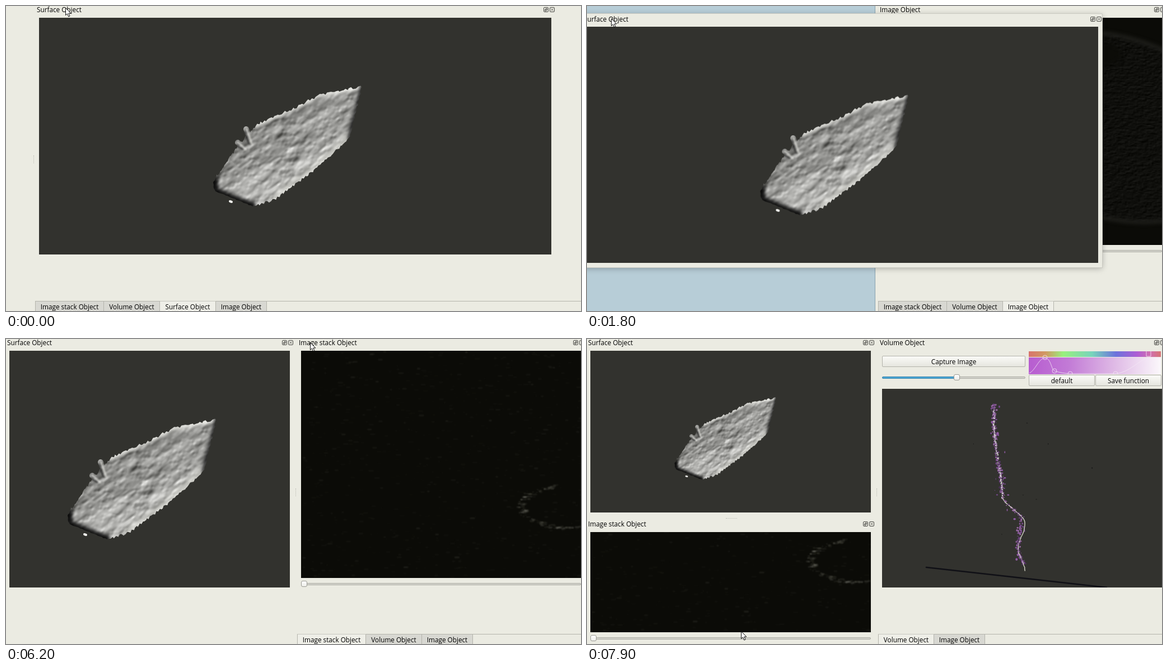
These frames come from a looping animation (1027 by 545 pixels, 8 s). An HTML page with a canvas:

```html
<!DOCTYPE html>
<html lang="en">
<head>
<meta charset="utf-8">
<title>Dock panels</title>
<style>
html, body { margin: 0; width: 100%; height: 100%; overflow: hidden; background: #ebebe2; }
body { position: relative; font: 11.75px/16px "Open Sans", "Noto Sans", sans-serif; color: #000; cursor: default; }
#stage { position: absolute; left: 0; top: 0; width: 1027px; height: 545px; overflow: hidden; background: #ebebe2; }
#stage div, canvas, svg { position: absolute; box-sizing: border-box; }
.panel { background: #ebebe2; }
.float { z-index: 5; border-radius: 2px 2px 0 0; box-shadow: 0 0 0 1px #cacac2, 0 2px 11px rgba(0,0,0,.28); }
.title { left: 3px; right: 0; top: 0; height: 16px; white-space: nowrap; }
.float .title { top: 1px; }
.late .title { top: 231px; }
.late .view { visibility: hidden; }
.icon { width: 9px; height: 9px; top: 4px; overflow: visible; fill: none; stroke: #4c4c48; }
.view { left: 7px; right: 7px; top: 23px; bottom: 8px; background: #32322e; overflow: hidden; }
.strip .view { bottom: 25px; background: #0b0b07; }
.slider { left: 7px; right: 7px; bottom: 8px; height: 12px; }
.groove { left: 0; right: 0; top: 4px; height: 4px; border: 1px solid #adada5; border-radius: 2px; background: #d3d3cc; }
.groove.full { right: auto; width: 134px; background: #4aa5d4; border-color: #3b87ae; }
.knob { left: 0; top: 0; width: 11px; height: 11px; border: 1px solid #9c9c95; border-radius: 3px; background: linear-gradient(#fff, #ecece8); }
.button { height: 20px; border: 1px solid #b3b3ab; border-radius: 2px; background: linear-gradient(#fafaf7, #e6e6df); text-align: center; line-height: 18px; }
.hues, .ramp { left: 269px; width: 236px; }
.hues { top: 24px; height: 10px; background: linear-gradient(90deg, #d8746c, #d09a62 13%, #98f07e 26%, #78d4bc 48%, #6c72dc 66%, #ae5ed4 82%, #d070b0 92%, #d87474); }
.ramp { top: 35px; height: 30px; background: linear-gradient(90deg, #b75dd0, #c27ad6 30%, #e0bce6 66%, #fbf8fb); }
#mesh { left: 50%; top: 50%; margin: -96.5px 0 0 -154.5px; transform-origin: 154.5px 96.5px; }
#image { left: 0; top: 0; width: 100%; height: 100%; }
#layers { left: 0; bottom: 0; }
#gap { background: #b7cdd7; border-right: 1px solid #87a2ae; }
#tabs { top: 527px; width: 1100px; height: 20px; border-top: 1px solid #b4b4ac; display: flex; }
#tabs .tab { position: static; height: 20px; background: #d8d8d2; border-right: 1px solid #b4b4ac; text-align: center; line-height: 18px; white-space: nowrap; }
#tabs .tab.on { margin-top: -1px; background: #efefe8; border-top: 1px solid #c8c8c0; line-height: 19px; }
#tabs .tab:first-child { border-left: 1px solid #b4b4ac; }
.grip { border: 0 dotted #bdbdb5; }
#gripV { top: 267px; height: 14px; border-left-width: 1px; }
#gripH { left: 248px; top: 320px; width: 20px; border-top-width: 1px; }
#pointer { z-index: 9; width: 12px; height: 19px; overflow: visible; }
</style>
</head>
<body>
<div id="stage">
  <div id="gap"></div>
  <div id="tabs"></div>
  <div id="gripV" class="grip"></div>
  <div id="gripH" class="grip"></div>
  <div id="surf" class="panel" data-title="Surface Object">
    <div class="view"><canvas id="mesh" width="280" height="228"></canvas></div>
  </div>
  <div id="img" class="panel strip" data-title="Image Object">
    <div class="view"><canvas id="image" width="501" height="406"></canvas></div>
    <div class="slider"><div class="groove"></div><div class="knob"></div></div>
  </div>
  <div id="vol" class="panel" data-title="Volume Object">
    <div class="button" style="left:7px;top:32px;width:256px">Capture Image</div>
    <div class="slider" style="right:251px;top:65px">
      <div class="groove"></div><div class="groove full"></div><div class="knob" style="left:128px"></div>
    </div>
    <div class="hues"></div>
    <div class="ramp"></div>
    <svg style="left:269px;top:24px" width="236" height="41" fill="none" stroke="#f4e8f6" stroke-opacity=".8">
      <path d="M1 39C12 34 18 12 29 12S40 33 46 35S60 39 74 40H155C180 38 196 16 214 11H236M210 0V9H218V0"/>
      <circle cx="29" cy="11" r="4"/><circle cx="46" cy="35" r="4"/><circle cx="74" cy="40" r="4"/><circle cx="155" cy="40" r="4"/>
    </svg>
    <div class="button" style="left:269px;top:66px;width:118px">default</div>
    <div class="button" style="left:388px;top:66px;width:118px">Save function</div>
    <div class="view" style="top:91px"><canvas id="neuron" width="501" height="355"></canvas></div>
  </div>
  <div id="stack" class="panel strip" data-title="Image stack Object">
    <div class="view"><canvas id="layers" width="501" height="406"></canvas></div>
    <div class="slider"><div class="groove"></div><div class="knob"></div></div>
  </div>
  <svg id="pointer" viewBox="0 0 12 19"><path d="M.5 .5V13.5L3.5 10.8L5.7 16L8 15L5.8 10H9.8Z" fill="#fff" stroke="#111"/></svg>
</div>
<script>
const $ = id => document.getElementById(id);

function rng(seed) {
  return () => {
    seed = (seed * 1664525 + 1013904223) >>> 0;
    return seed / 4294967296;
  };
}

// Smooth value noise
function hash(x, y) {
  const s = Math.sin(x * 127.1 + y * 311.7) * 43758.5453;
  return s - Math.floor(s);
}
function noise(x, y) {
  const i = Math.floor(x), j = Math.floor(y);
  let a = x - i, b = y - j;
  a *= a * (3 - 2 * a);
  b *= b * (3 - 2 * b);
  const top = hash(i, j) * (1 - a) + hash(i + 1, j) * a;
  const low = hash(i, j + 1) * (1 - a) + hash(i + 1, j + 1) * a;
  return top * (1 - b) + low * b;
}

function context(id, x, y) {
  const g = $(id).getContext('2d');
  g.translate(-x, -y);
  g.lineCap = g.lineJoin = 'round';
  return g;
}

// Grey canvas whose brightness is shade(x, y)
function texture(w, h, shade) {
  const c = document.createElement('canvas');
  c.width = w;
  c.height = h;
  const g = c.getContext('2d'), pixels = g.createImageData(w, h);
  for (let y = 0; y < h; y++) for (let x = 0; x < w; x++) {
    const v = shade(x, y);
    pixels.data.set([v, v, v - 3, 255], (y * w + x) * 4);
  }
  g.putImageData(pixels, 0, 0);
  return c;
}

function brush(g, color, width, blur, points) {
  g.filter = blur ? `blur(${blur}px)` : 'none';
  g.strokeStyle = color;
  g.lineWidth = width;
  g.beginPath();
  points.forEach(p => g.lineTo(...p));
  g.stroke();
  g.filter = 'none';
}

// Height of the surface: u runs along the body, v across it
function relief(u, v) {
  let h = 13 * noise(u / 28, v / 15) + 6 * noise(u / 12, v / 8) + 3 * noise(u / 6, v / 4);
  h += 5 * Math.abs(noise(u / 17 + 9, v / 9) - .5);
  for (let k = 0; k < 3; k++) {
    const fold = 7 - .003 * u * u + k * 13 + 9 * (noise(u / 14, k) - .5);
    const fade = Math.exp(-(((u + k * 22) / (72 - k * 12)) ** 4));
    h -= (2.8 - k * .6) * fade * Math.tanh((v - fold) / 2.5);
  }
  return h;
}

function drawMesh() {
  const X = 362, Y = 136, g = context('mesh', X, Y), rand = rng(7);
  const body = [[371,312], [410,256], [446,213], [501,188], [557,160], [636,143],
    [627,180], [613,236], [553,291], [480,346], [440,358], [374,331]];
  const horns = [[[429,220], [439,246]], [[414,244], [428,256]]];

  g.beginPath();
  body.forEach(([x, y], i) => {
    const [nx, ny] = body[(i + 1) % body.length];
    const rough = i > 5 && i < 7 || i > 9 ? 1.5 : 5;
    const steps = Math.ceil(Math.hypot(nx - x, ny - y) / 3.5);
    for (let k = 0; k < steps; k++) {
      const f = k / steps, swell = 4 * Math.sin(Math.PI * f) * (i % 4 === 3);
      g.lineTo(x + (nx - x) * f + rand() * 2 - 1 - swell * .3, y + (ny - y) * f + (rand() - .5) * rough + swell * .5);
    }
  });
  g.fill();
  horns.forEach(h => brush(g, '#000', 10, 0, h));

  const skin = texture(280, 228, (x, y) => {
    const dx = x + X - 503, dy = y + Y - 252;
    const u = dx * .79 - dy * .62, v = dx * .62 + dy * .79;
    const slope = relief(u - .2, v + 1.9) - relief(u + .2, v - 1.9);
    return 158 + .45 * v - .08 * u + slope * 12;
  });
  g.globalCompositeOperation = 'source-in';
  g.drawImage(skin, X, Y);
  g.globalCompositeOperation = 'source-atop';
  brush(g, 'rgba(255,255,250,.75)', 9, 2.5, body.slice(2, 6));
  brush(g, 'rgba(245,245,238,.5)', 16, 5, body.slice(7, 10));
  brush(g, 'rgba(10,10,10,.75)', 8, 2.5, body.slice(5, 8));
  brush(g, 'rgba(0,0,0,.9)', 14, 3, [...body.slice(10), body[0]]);
  horns.forEach(([a, b]) => {
    brush(g, 'rgba(15,15,15,.7)', 3, 1.5, [[a[0] - 3, a[1] + 5], [b[0] - 5, b[1]]]);
    brush(g, 'rgba(245,245,240,.7)', 3, 1.5, [[a[0] + 1, a[1]], b]);
  });
  g.globalCompositeOperation = 'source-over';
  brush(g, '#f2f2ee', 4, 0, [[400,349], [403,350]]);
}

function drawImage() {
  const g = context('image', 527, 21);
  const rim = () => {
    g.beginPath();
    g.ellipse(938, 216, 246, 161, .3, 0, 7);
  };
  const blot = (color, x, y, rx, ry, blur) => {
    g.filter = `blur(${blur}px)`;
    g.fillStyle = color;
    g.beginPath();
    g.ellipse(x, y, rx, ry, 0, 0, 7);
    g.fill();
    g.filter = 'none';
  };
  g.fillStyle = '#0b0b07';
  g.fillRect(527, 21, 501, 406);
  g.fillStyle = '#0f0f0b';
  g.fillRect(534, 25, 252, 15);
  g.font = '12.5px "DejaVu Sans", sans-serif';
  g.letterSpacing = '4px';
  g.fillStyle = '#22221e';
  g.fillText('Time Elapsed: 00:00:05', 552, 37);

  g.save();
  rim();
  g.clip();
  const grain = (x, y) => noise(x / 7, y / 3.5) + .6 * noise(x / 3, y / 2);
  g.drawImage(texture(501, 406, (x, y) => 15 + 13 * (grain(x, y) - grain(x + 2, y + 2))), 527, 21);
  blot('#0b0b07', 742, 262, 44, 46, 6);
  blot('#0b0b07', 800, 322, 36, 18, 6);
  blot('#0c0c08', 905, 86, 50, 22, 5);
  blot('#20201c', 790, 242, 12, 18, 4);
  blot('#1c1c18', 780, 278, 18, 8, 4);
  blot('#060603', 785, 222, 62, 5, 3);
  g.restore();
  g.filter = 'blur(3px)';
  g.strokeStyle = '#1e1e1a';
  g.lineWidth = 7;
  rim();
  g.stroke();
}

function drawLayers() {
  const g = context('layers', 527, 21), rand = rng(5);
  g.fillStyle = '#0b0b07';
  g.fillRect(527, 21, 501, 406);
  g.filter = 'blur(.8px)';
  const speck = (x, y, long, alpha) => {
    g.fillStyle = `rgba(225,225,210,${rand() * alpha})`;
    g.fillRect(x, y, 2 + rand() * long, 1 + rand() * 2);
  };
  for (let i = 0; i < 1100; i++) speck(527 + rand() * 501, 21 + rand() * 406, 8, i % 8 ? .05 : .1);
  for (let i = 0; i < 150; i++) {
    const a = 1.35 + rand() * 3.1, r = .92 + rand() * .16;
    speck(1005 + Math.cos(a) * 86 * r, 299 + Math.sin(a) * 38 * r, 8, .17);
  }
}

function ease(x, from, to) {
  const f = Math.max(0, Math.min(1, (x - from) / (to - from)));
  return f * f * (3 - 2 * f);
}

function drawNeuron() {
  const g = context('neuron', 527, 89), rand = rng(12);
  const core = y => 727 + 15 * ease(y, 150, 285) + 34 * ease(y, 282, 322)
    + 6 * Math.sin((y - 312) / 13) * ease(y, 305, 325);
  const sheath = y => core(y) - 9 * Math.sin(Math.PI * ease(y, 305, 370));
  const dots = (count, top, bottom, path, spread, size, colors) => {
    for (let i = 0; i < count; i++) {
      const y = top + rand() * (bottom - top);
      g.fillStyle = colors[i % colors.length];
      g.beginPath();
      g.ellipse(path(y) + (rand() + rand() - 1) * spread, y, .5 + rand() * size, .5 + rand() * size, 0, 0, 7);
      g.fill();
    }
  };
  brush(g, '#101016', 2.6, 0, [[606,408], [928,444]]);
  dots(8, 120, 400, () => 780, 150, 1, ['#1d1d1c']);
  dots(330, 116, 404, sheath, 5, 1.5, ['#7d4f90', '#96689f', '#4b3257']);
  dots(55, 116, 400, sheath, 15, 1.9, ['#74488a', '#8f5ba3']);
  dots(190, 125, 285, core, 2, .8, ['#dcdcd4', '#c9c2cc']);
  const tail = [];
  for (let y = 285; y <= 414; y += 3) tail.push([core(y) + rand() - .5, y]);
  brush(g, '#d4d4c6', 1.4, 0, tail);
  dots(110, 116, 404, sheath, 4, 1, ['#9a68ad', '#5e3e6d']);
}

document.querySelectorAll('.panel').forEach(p => {
  const icon = (right, d) => `<svg class="icon" style="right:${right}px" viewBox="0 0 9 9"><rect x=".5" y=".5" width="8" height="8" rx="1.5"/><path d="${d}"/></svg>`;
  p.insertAdjacentHTML('afterbegin', `<div class="title">${p.dataset.title}${
    icon(12.5, 'M2.5 4.5H5V6.8H2.5ZM4 4V2.5H6.6V5H5.5')}${icon(1.5, 'M2.5 2.5L6.5 6.5M6.5 2.5L2.5 6.5')}</div>`);
});
drawMesh();
drawImage();
drawLayers();
drawNeuron();

const STEP = 100;
const wide = [52, -2, 929, 454], left = [-1, -2, 515, 454], right = [520, -2, 514, 454];
const upper = [-1, -2, 515, 320], lower = [-1, 322, 515, 227];

// Progress of a move whose first and last visible steps are given
const ramp = (t, first, last) => Math.max(0, Math.min(1, (t - first + STEP) / (last - first + STEP)));
const mix = (a, b, f) => a.map((v, i) => v + (b[i] - v) * f);

// Pointer stops: first step, last step, x, y
const stops = [[1100,1100,103,5], [1200,1800,43,22], [2000,2000,38,25], [2700,2900,328,226], [3200,3200,590,431],
  [3400,3700,585,520], [3900,4000,591,542], [4700,4700,591,560], [5100,5300,568,210], [5600,6200,543,6],
  [6400,7000,388,418], [7100,7500,275,522]];
const pointerAt = t => stops.reduce((p, [first, last, x, y]) => mix(p, [x, y], ramp(t, first, last)), [106, 3]);

function surfaceAt(t, [px, py]) {
  if (t < 1100) return wide;
  if (t >= 2400) return mix(left, upper, ramp(t, 7300, 7500));
  const slip = ramp(t, 1200, 1800);
  const held = [px - 57 + 5 * slip, py - 6 - 2 * slip, 929, 453];
  return mix(held, left, ramp(t, 2200, 2400));
}

function stackAt(t, [px, py]) {
  return t < 6400 ? right : mix([px - 24, py - 8, 514, 454], lower, ramp(t, 7700, 7900));
}

function place(id, [x, y, w, h]) {
  Object.assign($(id).style, { left: x + 'px', top: y + 'px', width: w + 'px', height: h + 'px' });
}
function show(id, on) {
  $(id).style.display = on ? '' : 'none';
}

const tabWidth = { 'Image stack': 123, Volume: 100, Surface: 100, Image: 91 };
let tabKey;
function setTabs(names, active) {
  const key = names + active;
  if (key === tabKey) return;
  tabKey = key;
  $('tabs').innerHTML = names.map(n =>
    `<div class="tab${n === active ? ' on' : ''}" style="width:${tabWidth[n]}px">${n} Object</div>`).join('');
}

function render(t) {
  const pointer = pointerAt(t), surf = surfaceAt(t, pointer);
  const dock = mix(wide, right, ramp(t, 1600, 1800));
  const settling = t === 1100;

  place('surf', surf);
  $('surf').classList.toggle('float', t >= 1100 && t < 2400);
  $('mesh').style.transform = `scale(${(surf[3] - 31) / 423})`;

  show('img', t >= 1100 && t < 4900);
  $('img').classList.toggle('late', settling);
  place('img', settling ? [52, -2, 929, 529] : dock);

  show('vol', t >= 6400);
  place('vol', right);

  show('stack', t >= 4900);
  place('stack', stackAt(t, pointer));
  $('stack').classList.toggle('float', t >= 6400 && t < 7900);

  const side = t >= 1600 && t < 2400;
  show('gap', side || t >= 7300 && t < 7900);
  place('gap', side ? [0, 0, dock[0] - 5, 545] : [0, surf[3] - 1, 515, 545]);

  $('tabs').style.left = dock[0] + 'px';
  const names = ['Image stack', 'Volume', 'Surface', 'Image'];
  if (t >= 1100) names.splice(2, 1);
  if (t >= 6400) names.shift();
  setTabs(names, t < 1100 ? 'Surface' : t < 4900 ? 'Image' : names[0]);

  $('gripV').style.left = dock[0] - 3 + 'px';
  show('gripH', t >= 7900);
  $('pointer').style.left = pointer[0] + 'px';
  $('pointer').style.top = pointer[1] + 'px';
}

const begin = performance.now();
function tick() {
  render(Math.floor((performance.now() - begin) % 8000 / STEP) * STEP);
  requestAnimationFrame(tick);
}
tick();
</script>
</body>
</html>
```
